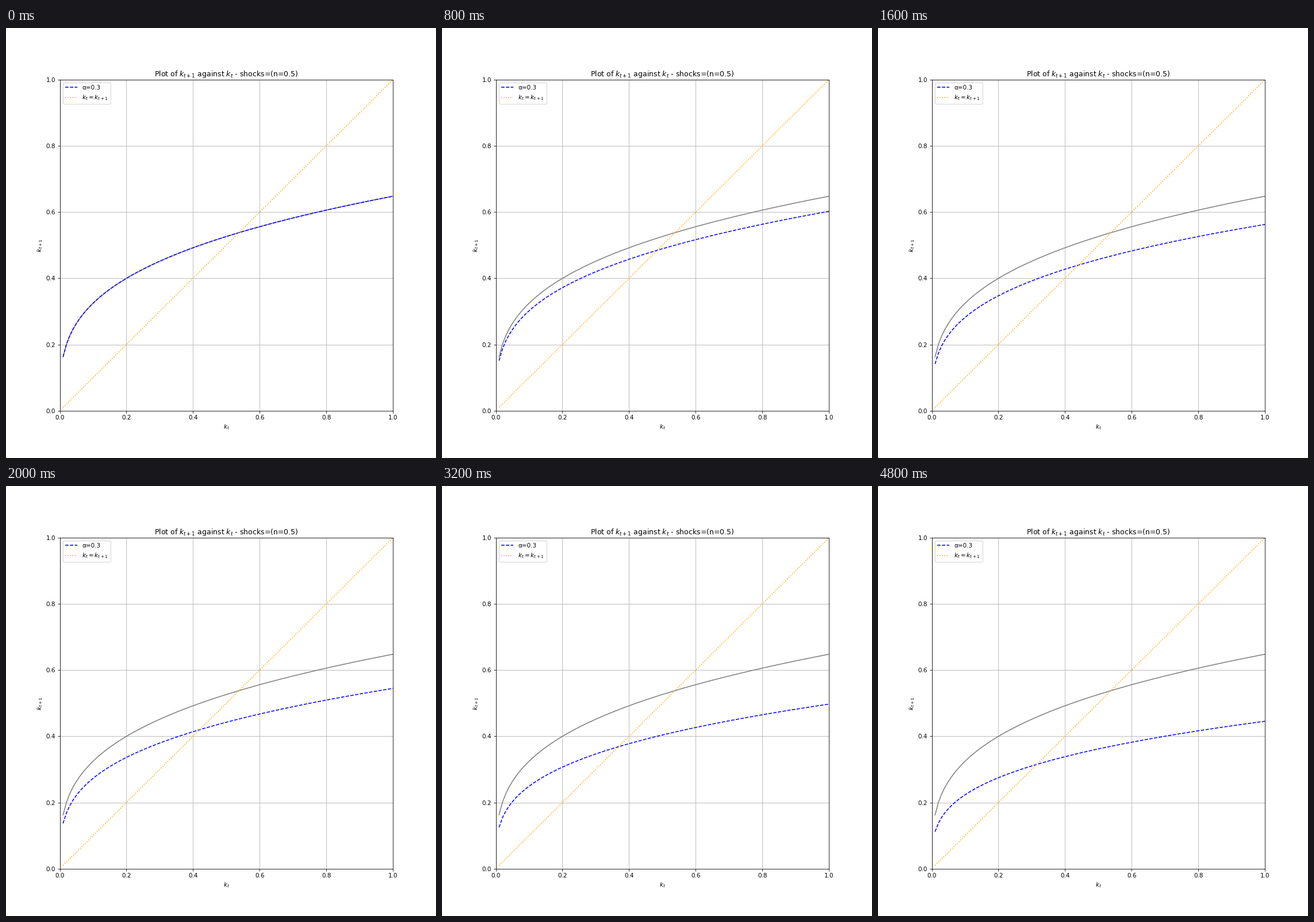
Recreate the animation shown at these times as a matplotlib script. Size 748 by 748 pixels, loop 5000 ms.

```python
import numpy as np
import matplotlib.pyplot as plt
from matplotlib.animation import FuncAnimation

SIZE = 748
FRAMES = 25
INTERVAL = 200
ALPHA = 0.3
SCALE = 0.7125

capital = np.linspace(0.01, 1, 100)
growth = np.linspace(0.1, 0.6, FRAMES)


def next_capital(n):
    return SCALE / (1 + n) * capital**ALPHA


plt.rcParams["font.family"] = "DejaVu Sans"
dpi = SIZE / 10
fig, ax = plt.subplots(figsize=(10, 10), dpi=dpi)

ax.plot(capital, next_capital(growth[0]), color="gray")
curve, = ax.plot(capital, next_capital(growth[0]), "--", color="blue",
                 label=f"α={ALPHA}")
ax.plot(capital, capital, ":", color="orange", label="$k_t = k_{t+1}$")

ax.set(xlim=(0, 1), ylim=(0, 1), xlabel="$k_t$", ylabel="$k_{t+1}$",
       title="Plot of $k_{t+1}$ against $k_t$ - shocks=(n=0.5)")
ax.grid(True)
ax.legend(loc="upper left")


def update(frame):
    curve.set_ydata(next_capital(growth[frame]))
    return curve,


animation = FuncAnimation(fig, update, frames=FRAMES, interval=INTERVAL,
                          repeat=True, repeat_delay=0)
plt.show()
```
